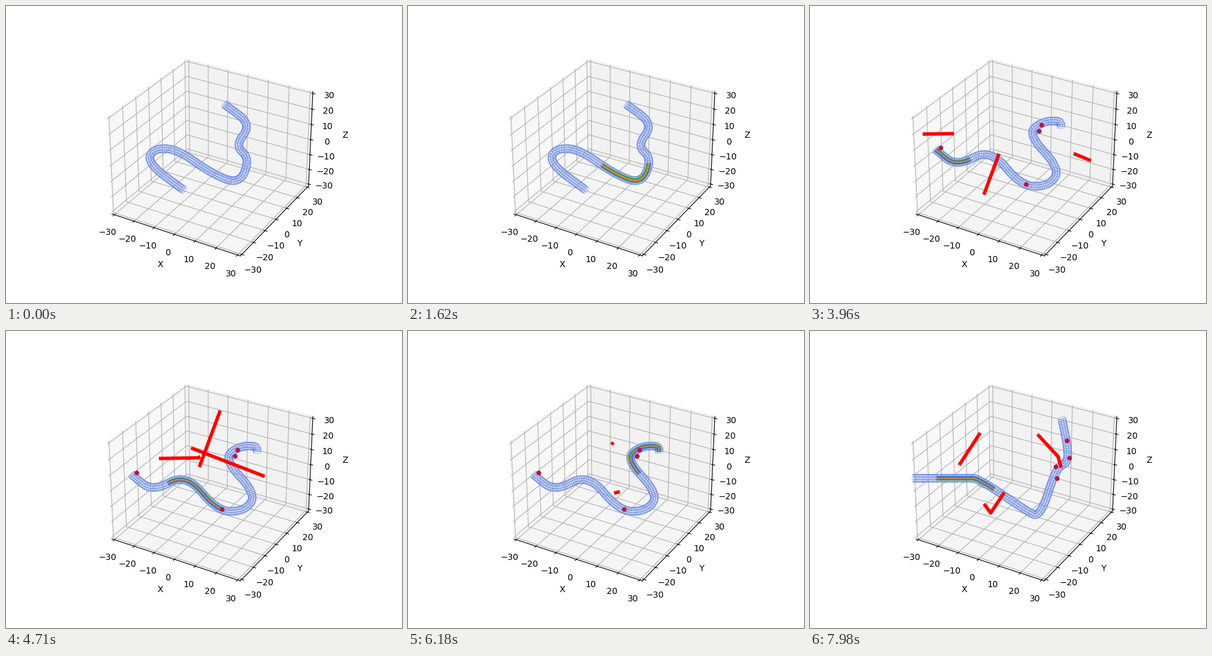
A matplotlib script for the animation above (8000 ms loop, 640 by 480 pixels).

```python
import numpy as np
import matplotlib.pyplot as plt
from matplotlib.animation import FuncAnimation
from matplotlib.collections import LineCollection

STEP = 30            # ms between poses
WORM_SPAN = 740      # ms of travel covered by the worm's body
TRAIL_SPAN = 620     # ms of travel covered by each red trail
RADIUS = 6.7         # tube radius in pixels
TILT = .3            # how far each ring is opened towards the viewer

# bends: corners of the tube, rounded off later; trails: corners as (ms, x, y)
SCENES = [
    dict(start=0, travel=2900, side=1, worm_z=4, dots_end=0, dots=[], trails=[],
         bends=[(353, 159), (397, 191), (370, 226), (394, 246), (378, 288),
                (334, 272), (273, 229), (234, 232), (231, 256), (288, 298)]),
    dict(start=3510, travel=2560, side=-1, worm_z=2, dots_end=2810,
         bends=[(203, 232), (237, 260), (291, 230), (342, 292), (386, 291),
                (405, 264), (352, 207), (374, 187), (405, 185), (406, 196)],
         dots=[(211, 229), (349, 288), (374, 192), (370, 202)],
         trails=[[(0, 182, 207), (1140, 310, 205), (1380, 327, 198),
                  (1890, 353, 257), (2190, 333, 262)],
                 [(0, 454, 250), (660, 413, 233), (1200, 299, 189),
                  (1390, 314, 201), (2190, 332, 180)],
                 [(0, 281, 305), (2190, 400, -17)]]),
    dict(start=6960, travel=2900, side=1, worm_z=2, dots_end=2810,
         bends=[(167, 238), (255, 238), (272, 238), (350, 291), (372, 302),
                (398, 220), (416, 214), (417, 190), (407, 141)],
         dots=[(415, 177), (419, 205), (397, 219), (399, 238)],
         trails=[[(0, 297, 131), (2190, 177, 315)],
                 [(0, 260, 250), (600, 292, 294), (1020, 314, 261)],
                 [(0, 338, 135), (850, 401, 203), (1020, 406, 221)]]),
]


def rounded_path(bends, count=500):
    """Quadratic B-spline through the leg midpoints, evenly spaced by length."""
    p = np.array(bends, float)
    mids = (p[:-1] + p[1:]) / 2
    u = np.linspace(0, 1, 60)[:, None]
    arcs = [(1 - u) ** 2 * a + 2 * u * (1 - u) * corner + u ** 2 * b
            for a, corner, b in zip(mids, p[1:-1], mids[1:])]
    curve = np.vstack([p[:1], *arcs, p[-1:]])
    arc = np.r_[0, np.cumsum(np.hypot(*np.diff(curve, axis=0).T))]
    even = np.linspace(0, arc[-1], count)
    xy = np.column_stack([np.interp(even, arc, c) for c in curve.T])
    tangent = np.gradient(xy, axis=0)
    tangent /= np.hypot(*tangent.T)[:, None]
    normal = np.column_stack([-tangent[:, 1], tangent[:, 0]])
    return xy, tangent, normal, arc[-1]


def build_tube(ax, scene):
    xy, tangent, normal, length = rounded_path(scene["bends"])
    scene["path"] = xy, normal

    def around(angle):
        return xy + RADIUS * (np.cos(angle) * normal + TILT * np.sin(angle) * tangent)

    shell = np.stack([around(a) for a in np.linspace(0, 2 * np.pi, 25)], axis=1)
    picks = np.linspace(0, len(xy) - 1, int(length / 2.8)).astype(int)
    rails = [around(a)[::4] for a in np.linspace(0, 2 * np.pi, 10, endpoint=False)]
    edge = np.vstack([xy + RADIUS * normal, (xy - RADIUS * normal)[::-1]])
    wires = [LineCollection(lines, colors="royalblue", linewidths=.5,
                            alpha=.55, zorder=3) for lines in (shell[picks], rails)]
    return [ax.fill(*edge.T, color="#dde3f7", alpha=.55, lw=0, zorder=1)[0],
            *map(ax.add_collection, wires)]


def draw_box(fig):
    """Render the empty 3D box once and keep it as a backdrop."""
    box = fig.add_subplot(projection="3d")
    limits = np.array([-30, 30]) * 25 / 24
    box.set(xlim=limits, ylim=limits, zlim=limits,
            xlabel="X", ylabel="Y", zlabel="Z")
    fig.canvas.draw()
    backdrop = np.array(fig.canvas.buffer_rgba())
    box.remove()
    fig.figimage(backdrop, zorder=-1)


fig = plt.figure(figsize=(6.4, 4.8), dpi=100)
draw_box(fig)
ax = fig.add_axes([.125, .11, .775, .77])
ax.set(xlim=(80, 576), ylim=(427.2, 57.6), autoscale_on=False)
ax.axis("off")

tubes = [build_tube(ax, scene) for scene in SCENES]
worm = [ax.plot([], [], color=c, lw=1.8, solid_capstyle="butt")[0]
        for c in ("C0", "C2", "C1")]
trails = [ax.plot([], [], color="red", lw=4, solid_capstyle="butt", zorder=6)[0]
          for _ in range(3)]
dots = ax.scatter([], [], s=20, color="#b8163f", zorder=5)


def trail_points(keys, t):
    times, x, y = np.array(keys, float).T
    lo, hi = max(t - TRAIL_SPAN, 0), min(t, times[-1])
    if hi <= lo:
        return [], []
    ts = np.r_[lo, times[(times > lo) & (times < hi)], hi]
    return np.interp(ts, times, x), np.interp(ts, times, y)


def update(i):
    now = STEP * ((2 * i + 1) // 3)
    active = sum(now >= s["start"] for s in SCENES) - 1
    scene = SCENES[active]
    t = now - scene["start"]
    for n, parts in enumerate(tubes):
        for part in parts:
            part.set_visible(n == active)

    xy, normal = scene["path"]
    reach = np.clip(np.array([t - WORM_SPAN, t]) / scene["travel"], 0, 1)
    body = slice(*(reach * len(xy)).astype(int))
    for strand, offset in zip(worm, (-2.4, 2.4, 0)):
        pts = xy[body] + scene["side"] * offset * normal[body]
        strand.set_data(pts[:, 0], pts[:, 1])
        strand.set_zorder(scene["worm_z"])

    for n, trail in enumerate(trails):
        keys = scene["trails"]
        trail.set_data(*(trail_points(keys[n], t) if keys else ([], [])))
    shown = scene["dots"] if t < scene["dots_end"] else []
    dots.set_offsets(np.array(shown, float).reshape(-1, 2))
    return [*worm, *trails, dots]


anim = FuncAnimation(fig, update, frames=400, interval=20, repeat=True,
                     repeat_delay=0, blit=False)
plt.show()
```
